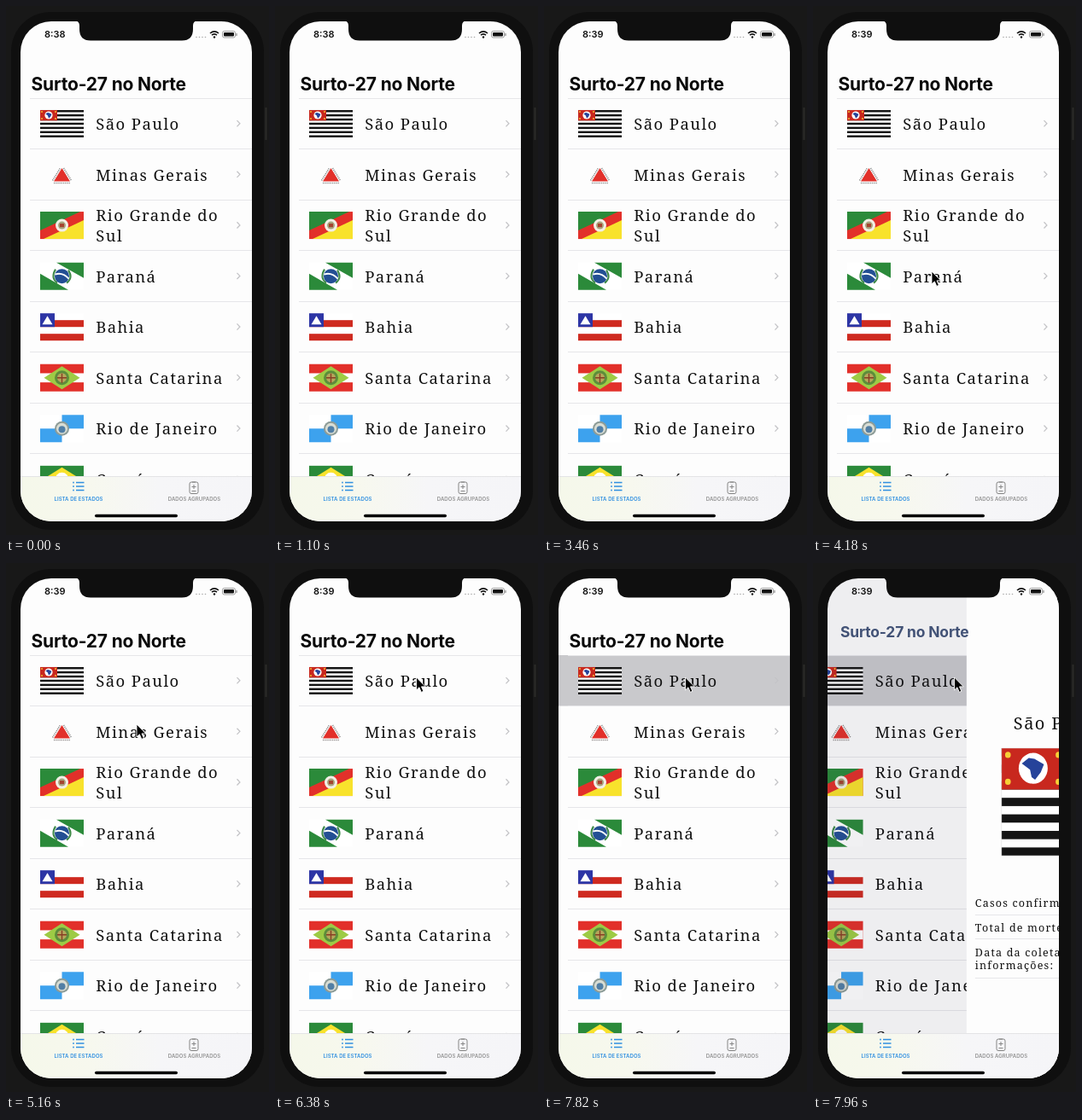
An HTML page that plays this animation: 308 by 620 pixels, repeating every 8 s.

```html
<!DOCTYPE html>
<html lang="pt">
<head>
<meta charset="utf-8">
<style>
html, body { margin: 0; width: 100%; height: 100%; overflow: hidden; background: #181818; }
svg { display: block; width: 308px; height: 620px; }
.sans { font-family: Inter, Roboto, sans-serif; }
.typed { font: 18.5px "Noto Serif", serif; letter-spacing: 1.4px; fill: #111; }
.small { font-size: 12.5px; letter-spacing: 1.2px; }
.tab { font-size: 6px; font-weight: 600; letter-spacing: .08px; text-anchor: middle; }
.rule { stroke: #e6e6e9; stroke-width: 1; }
</style>
</head>
<body>
<svg id="stage" viewBox="0 0 308 620"></svg>
<script>
const LOOP = 8000, CLOCK_TICK = 2600, PRESS = 7540, PUSH = 7860;
const LEFT = 17, WIDTH = 271, ROW_TOP = 108, PITCH = 59.55;

const rect = (x, y, w, h, fill, extra = '') =>
  `<rect x="${x}" y="${y}" width="${w}" height="${h}" fill="${fill}" ${extra}/>`;
const shape = (points, fill) => `<polygon points="${points}" fill="${fill}"/>`;
const disc = (x, y, r, fill) => `<circle cx="${x}" cy="${y}" r="${r}" fill="${fill}"/>`;
const line = (d, stroke, width = 1, extra = '') =>
  `<path d="${d}" fill="none" stroke="${stroke}" stroke-width="${width}" ${extra}/>`;
const text = (x, y, value, cls = 'typed', extra = '') =>
  `<text x="${x}" y="${y}" class="${cls}" ${extra}>${value}</text>`;
const rule = (x, y) => `<path d="M${x} ${y}H288" class="rule"/>`;

// Flags are drawn in a 51 x 32 box.
const RED = '#e2302a', GREEN = '#2b8a3a', YELLOW = '#f8e22c';

function saoPaulo() {
  const stripe = 32 / 13;
  let s = rect(0, 0, 51, 32, '#fff');
  for (let i = 0; i < 13; i += 2) s += rect(0, i * stripe, 51, stripe, '#141414');
  s += rect(0, 0, 20, 5 * stripe, '#c8281e') + disc(10, 6, 4.6, '#fff');
  s += shape('6.4,4.6 8.6,2.9 10.4,3.2 13.4,4.8 12.4,7.2 10.6,9.4 9.5,8.6 9,6.4', '#26439a');
  for (const x of [2, 18]) for (const y of [2, 10]) s += disc(x, y, .9, '#f6cf36');
  return s;
}

const flags = {
  sp: saoPaulo(),
  mg: line('M14.5 23L23.5 8.5M27.5 8.5L36.5 23M16 26H35', '#8c8c8c', 1.6, 'stroke-dasharray="1.2 1"') +
    shape('25.5,8.5 16,24 35,24', RED),
  rs: rect(0, 0, 51, 32, RED) + shape('0,0 47,0 0,22', GREEN) +
    shape('51,10 51,32 4,32', YELLOW) + disc(25.5, 16, 7.5, '#f3efe6') +
    disc(25.5, 16, 4.5, '#a9a27c') + rect(23, 14, 5, 4, '#a5432f'),
  pr: rect(0, 0, 51, 32, '#fff') + shape('19,0 51,0 51,18', GREEN) +
    shape('0,13 0,32 33,32', GREEN) +
    line('M18 8Q12 18 20 24M33 9Q39 18 31 24', '#3f8a49', 2) +
    disc(25.5, 16, 8.5, '#234f94') + line('M17.5 14Q26 11 33.5 19', '#fff', 2),
  ba: rect(0, 0, 51, 32, '#fff') + rect(0, 8, 51, 8, '#cf2a20') +
    rect(0, 24, 51, 8, '#cf2a20') + rect(0, 0, 17, 16, '#2d35a5') +
    shape('8.5,3 2.5,13 14.5,13', '#fff'),
  sc: rect(0, 0, 51, 32, RED) + rect(0, 10.7, 51, 10.7, '#fff') +
    shape('25.5,2.5 46.5,16 25.5,29.5 4.5,16', '#9dcb45') + disc(25.5, 16, 8.5, '#5d8c3b') +
    disc(25.5, 16, 5.5, '#b5a65a') + line('M20 16H31M25.5 11V22', '#873e24', 1.4),
  rj: rect(0, 0, 51, 32, '#fff') + rect(25.5, 0, 25.5, 16, '#3da2ee') +
    rect(0, 16, 25.5, 16, '#3da2ee') + disc(25.5, 16, 8.5, '#8d9c98') +
    disc(25.5, 16, 6.5, '#d9ddd4') + disc(25.5, 17, 4, '#527fa5'),
  ce: rect(0, 0, 51, 32, GREEN) + shape('25.5,2 48,16 25.5,30 3,16', YELLOW) +
    disc(25.5, 16, 8, '#fff')
};

const states = [
  ['sp', 'São Paulo'], ['mg', 'Minas Gerais'], ['rs', 'Rio Grande do', 'Sul'],
  ['pr', 'Paraná'], ['ba', 'Bahia'], ['sc', 'Santa Catarina'],
  ['rj', 'Rio de Janeiro'], ['ce', 'Ceará']
];

const rows = states.map(([flag, ...label], i) => {
  const y = ROW_TOP + i * PITCH, mid = y + PITCH / 2;
  const first = label.length > 1 ? mid - 5 : mid + 7.3;
  return rule(28, Math.floor(y) + .5) +
    `<g transform="translate(40 ${mid - 15.8})">${flags[flag]}</g>` +
    label.map((part, n) => text(105.3, first + n * 24, part)).join('') +
    line(`M270.5 ${mid - 3.6}l3.4 3.6l-3.4 3.6`, '#c4c4c7', 1.3);
}).join('');

const detail = rect(0, 18, WIDTH, 590, '#fdfdfd') +
  text(55, 195, 'São Paulo - SP', 'typed', 'style="font-size:20px"') +
  `<g transform="translate(41 217) scale(3.7 3.94)">${flags.sp}</g>` +
  `<rect x="41" y="217" width="189" height="126" fill="none" stroke="#d8d8d8" stroke-width=".5"/>` +
  [[403, 'Casos confirmados:'], [432, 'Total de mortes:'], [461, 'Data da coleta das'], [476, 'informações:']]
    .map(([y, label]) => text(10, y, label, 'typed small')).join('') +
  [412.5, 440.5, 486.5].map(y => `<path d="M10 ${y}H271" class="rule"/>`).join('');

const tabs = rect(LEFT, 551, WIDTH, 54, 'url(#glass)') + line('M17 551.5H288', '#e4e4e6') +
  [558.5, 563, 567.5].map(y => disc(79, y, .9, '#2f8fe0') + line(`M82 ${y}H91.5`, '#2f8fe0', 1.3)).join('') +
  text(85, 579.5, 'LISTA DE ESTADOS', 'sans tab', 'fill="#2f8fe0"') +
  `<rect x="215" y="558" width="10" height="13.5" rx="2" fill="none" stroke="#858585"/>` +
  line('M218 558H222M220 561V566M217.5 563.5H222.5M217.5 568.5H222.5', '#858585') +
  text(220.5, 579.5, 'DADOS AGRUPADOS', 'sans tab', 'fill="#929292"') +
  rect(104, 595.8, 97, 3.4, '#000', 'rx="1.7"');

const status = text(45, 37, '8:38', 'sans', 'id="clock" font-size="11" font-weight="600" fill="#111"') +
  [223, 226.5, 230, 233.5].map(x => disc(x, 36.5, .8, '#aaa')).join('') +
  line('M239 32Q244 27.6 249 32M241 34.2Q244 31.6 247 34.2', '#111', 1.6) + disc(244, 36.5, 1.2, '#111') +
  `<rect x="253.5" y="29.5" width="15" height="7.5" rx="2" fill="none" stroke="#8a8a8a" stroke-width=".8"/>` +
  rect(255, 31, 12, 4.5, '#111', 'rx="1"') + rect(269.4, 32, 1.2, 3, '#8a8a8a');

const stage = document.getElementById('stage');
stage.innerHTML = `
<defs>
  <clipPath id="screen"><rect x="17" y="18" width="271" height="586" rx="36"/></clipPath>
  <linearGradient id="glass">
    <stop offset="0" stop-color="#f5f8ea"/><stop offset=".3" stop-color="#f7f8ee"/>
    <stop offset=".6" stop-color="#f6f6f8"/><stop offset="1" stop-color="#f5f5f8"/>
  </linearGradient>
</defs>
${rect(0, 0, 308, 620, '#181818')}
${rect(303.5, 119, 2, 38, '#2b2b28')}
${rect(6, 7, 296, 607, '#0f0f0f', 'rx="46"')}
<g clip-path="url(#screen)">
  ${rect(LEFT, 18, WIDTH, 586, '#fdfdfd')}
  <g id="list">${rect(LEFT, ROW_TOP, WIDTH, PITCH, '#c9c9cc', 'id="press"')}${rows}</g>
  ${rect(LEFT, 18, WIDTH, 586, '#303048', 'id="dim"')}
  <g id="detail">${detail}</g>
  ${text(0, 0, 'Surto-27 no Norte', 'sans', 'id="title" font-size="21" font-weight="700" letter-spacing="-.2"')}
  ${tabs}${status}
</g>
<path d="M81 17Q86 18 86 23V27Q86 40.5 99 40.5H206Q219 40.5 219 27V23Q219 18 224 17Z" fill="#0f0f0f"/>
<path id="cursor" d="M0 0V15L3.4 11.8L5.8 17.4L8.4 16.3L6 10.9H10.8Z" fill="#000" stroke="#fff" stroke-width=".9"/>`;

const [clock, list, press, dim, title, page, cursor] =
  ['clock', 'list', 'press', 'dim', 'title', 'detail', 'cursor'].map(id => document.getElementById(id));

// time, x, y of the pointer tip
const pointer = [
  [3440, -14, 440], [3960, 139, 311], [4280, 139, 311],
  [5120, 153, 189], [5240, 153, 189], [6000, 165.5, 134]
];
const mix = (a, b, p) => a + (b - a) * p;

function pointerAt(t) {
  const next = pointer.findIndex(step => step[0] > t);
  if (next < 0) return pointer.at(-1).slice(1);
  if (next === 0) return pointer[0].slice(1);
  const [from, to] = [pointer[next - 1], pointer[next]];
  const u = (t - from[0]) / (to[0] - from[0]), p = u * u * (3 - 2 * u);
  return [mix(from[1], to[1], p), mix(from[2], to[2], p)];
}

// Critically damped spring
function pushAt(t) {
  const x = Math.max(0, t - PUSH) * .0136;
  return 1 - (1 + x) * Math.exp(-x);
}

function draw(t) {
  const p = pushAt(t), morph = Math.min(1, p / .39);
  const channels = [66, 82, 118].map(c => Math.round(mix(8, c, morph)));
  clock.textContent = t < CLOCK_TICK ? '8:38' : '8:39';
  press.setAttribute('visibility', t >= PRESS ? 'visible' : 'hidden');
  list.setAttribute('transform', `translate(${-.3 * WIDTH * p} 0)`);
  dim.setAttribute('opacity', .07 * morph);
  title.setAttribute('transform',
    `translate(${mix(29.5, 32, morph)} ${mix(98.5, 87, morph)}) scale(${mix(1, .83, morph)})`);
  title.setAttribute('fill', `rgb(${channels})`);
  page.setAttribute('transform', `translate(${LEFT + WIDTH * (1 - p)} 0)`);
  cursor.setAttribute('transform', `translate(${pointerAt(t).join(' ')})`);
}

const start = performance.now();
function tick() {
  draw((performance.now() - start) % LOOP);
  requestAnimationFrame(tick);
}
tick();
</script>
</body>
</html>
```
